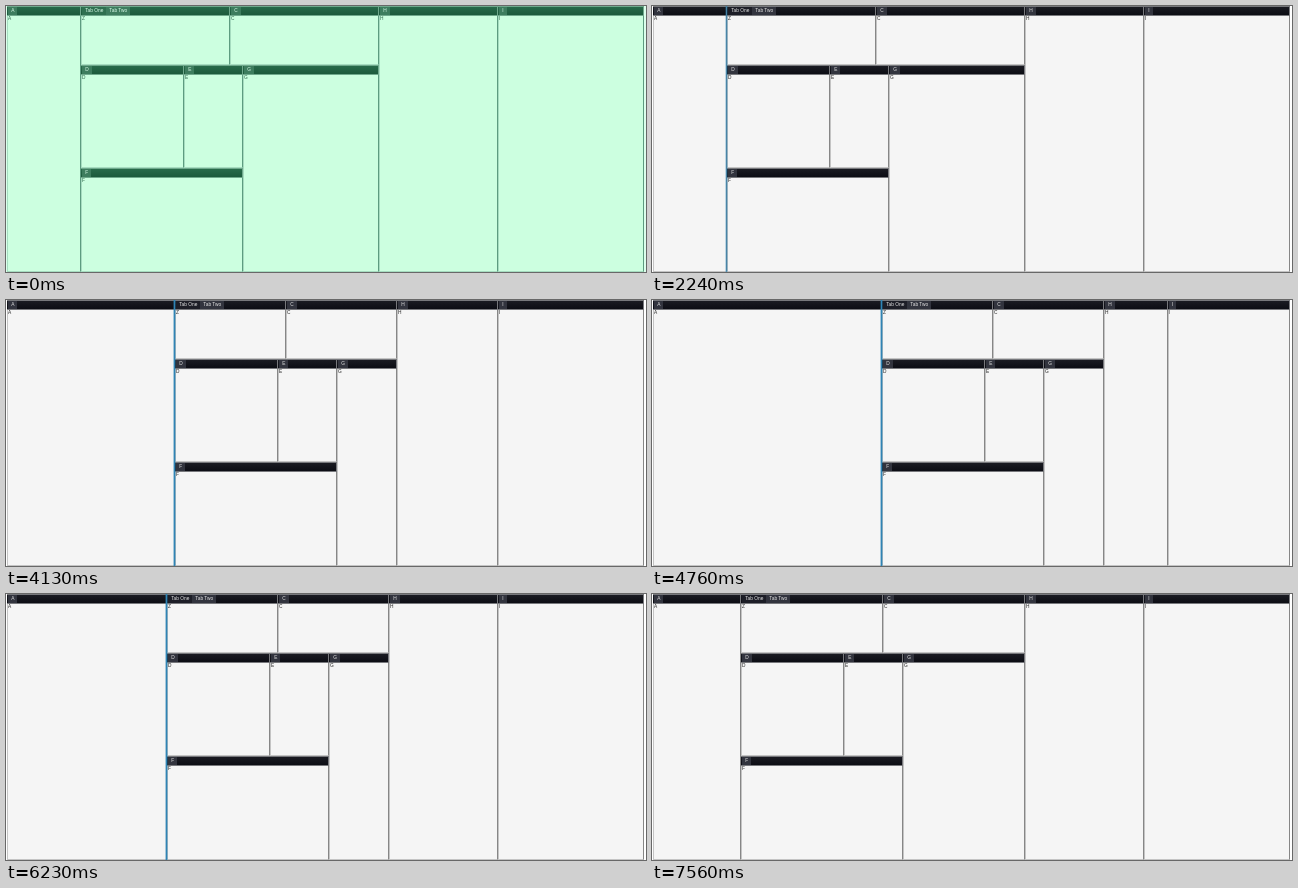
Write an HTML page that moves like this. It is 640 by 266 pixels and loops after 8.33 s.

```html
<!DOCTYPE html>
<html lang="en">
<head>
<meta charset="utf-8">
<title>Resizable panels</title>
<style>
@property --x { syntax: "<length>"; inherits: true; initial-value: 75px; }

html, body { margin: 0; width: 100%; height: 100%; overflow: hidden; }

.stage {
  /* left edges of the columns; minimum widths push H and I to the right */
  --h: max(373px, var(--x) + 222px);
  --i: max(492px, var(--h) + 63.5px);
  --c: calc((var(--x) + var(--h)) / 2);
  --e: calc(var(--x) + 103px);
  --g: calc(var(--x) + 162px);
  --end: 638px;
  position: relative;
  width: 640px;
  height: 266px;
  overflow: hidden;
  background: var(--page);
  font: 4.8px/8px "Liberation Sans", Arial, sans-serif;
  animation: drag 8330ms infinite, tint 8330ms step-end infinite;
}

.panel {
  position: absolute;
  left: var(--l);
  width: calc(var(--r) - var(--l));
  top: var(--t);
  height: calc(var(--b) - var(--t));
}
.panel header {
  position: absolute;
  inset: 0 0 auto;
  box-sizing: border-box;
  height: 10px;
  padding: 1px 0 1px 1.2px;
  border-right: 1px solid var(--edge);
  display: flex;
  overflow: hidden;
  white-space: nowrap;
  background: linear-gradient(var(--edge) 1px, var(--bar1) 1px, var(--bar2) 9px, var(--edge) 9px);
}
.panel header span {
  padding: 0 3px;
  color: var(--label);
  background: var(--tab);
}
.panel header .front { background: var(--front); }
.panel p {
  position: absolute;
  inset: 10px 0 0;
  margin: 0;
  box-sizing: border-box;
  border: 1px solid var(--soft);
  border-top: 0;
  border-right-color: var(--line);
  line-height: 6px;
  color: var(--ink);
  background: var(--fill);
}

.top { --t: 0px; --b: 266px; }
.row1 { --t: 0px; --b: 59px; }
.row2 { --t: 59px; --b: 162px; }
.row3 { --t: 162px; --b: 266px; }
.tall { --t: 59px; --b: 266px; }

.splitter {
  position: absolute;
  left: calc(var(--x) - 2px);
  top: 0;
  width: 1px;
  height: 266px;
  border: solid #2f84b566;
  border-width: 0 1px;
  background: #2f84b5 padding-box;
  animation: hover 8330ms step-end infinite;
}

@keyframes drag {
  0%     { --x: 75px; }
  36.12% { --x: 75px;  animation-timing-function: steps(5); }
  40.32% { --x: 103px; animation-timing-function: steps(7); }
  46.2%  { --x: 143px; animation-timing-function: steps(12); }
  56.29% { --x: 221px; animation-timing-function: steps(1); }
  57.13% { --x: 230px; animation-timing-function: steps(5); }
  61.33% { --x: 239px; }
  62.17% { --x: 239px; animation-timing-function: steps(7); }
  68.05% { --x: 207px; animation-timing-function: steps(5); }
  72.25% { --x: 181px; animation-timing-function: steps(3); }
  74.78% { --x: 161px; animation-timing-function: steps(9); }
  82.34% { --x: 97px;  animation-timing-function: steps(3); }
  84.86%, 100% { --x: 89px; }
}
@keyframes tint {
  0% {
    --page: #dcffec; --fill: #ccffe0; --line: #5d9c80; --soft: #a6dcc0; --edge: #6fa98c; --ink: #2a6648;
    --bar1: #286a4a; --bar2: #1c5a3c; --tab: #3d7d5e; --front: #2f7050; --label: #dcffec;
  }
  0.83%, 100% {
    --page: #fff; --fill: #f5f5f5; --line: #868686; --soft: #c4c4c4; --edge: #77787c; --ink: #222;
    --bar1: #1a1b22; --bar2: #0c0d14; --tab: #32343e; --front: #1d1e27; --label: #e6e6e6;
  }
}
@keyframes hover {
  0%     { opacity: 0; }
  26.88% { opacity: .7; }
  28.56% { opacity: 1; }
  88.22% { opacity: .5; }
  89.06%, 100% { opacity: 0; }
}
</style>
</head>
<body>
<main class="stage">
  <section class="panel top" style="--l: 1px; --r: var(--x)"><header><span>A</span></header><p>A</p></section>
  <section class="panel row1" style="--l: var(--x); --r: var(--c)"><header><span class="front">Tab One</span><span>Tab Two</span></header><p>Z</p></section>
  <section class="panel row1" style="--l: var(--c); --r: var(--h)"><header><span>C</span></header><p>C</p></section>
  <section class="panel row2" style="--l: var(--x); --r: var(--e)"><header><span>D</span></header><p>D</p></section>
  <section class="panel row2" style="--l: var(--e); --r: var(--g)"><header><span>E</span></header><p>E</p></section>
  <section class="panel row3" style="--l: var(--x); --r: var(--g)"><header><span>F</span></header><p>F</p></section>
  <section class="panel tall" style="--l: var(--g); --r: var(--h)"><header><span>G</span></header><p>G</p></section>
  <section class="panel top" style="--l: var(--h); --r: var(--i)"><header><span>H</span></header><p>H</p></section>
  <section class="panel top" style="--l: var(--i); --r: var(--end)"><header><span>I</span></header><p>I</p></section>
  <div class="splitter"></div>
</main>
</body>
</html>
```
